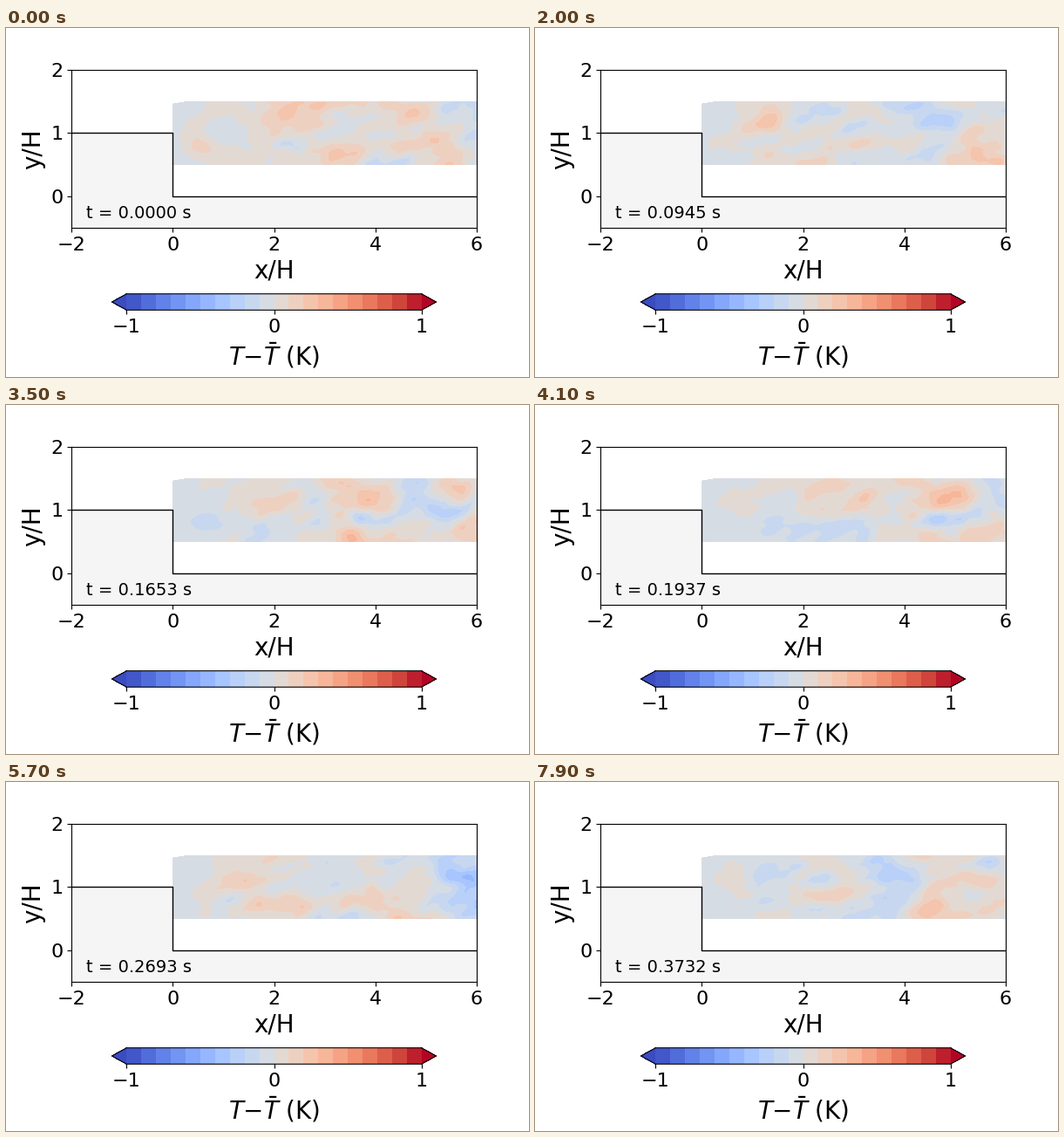
Animation of 600x400 px, one loop 8 s. Source, as a matplotlib script:

```python
import numpy as np
import matplotlib.pyplot as plt
from matplotlib.animation import FuncAnimation

STEPS, INTERVAL = 80, 100
DT = 0.3732 / 79      # simulated seconds per step
PERIOD = 64           # steps until the flow repeats
SPEED = 0.15          # convection, step heights per step
LEVELS = np.linspace(-1, 1, 21)

# Turbulence lives in a periodic box that passes by once per period
NX, NY = 320, 64
BOX_X, BOX_Y = PERIOD * SPEED, 2
rng = np.random.default_rng(11)
kx = 2 * np.pi * np.fft.fftfreq(NX, BOX_X / NX)[None, :]
ky = 2 * np.pi * np.fft.fftfreq(NY, BOX_Y / NY)[:, None]


def eddy_spectrum(length, height, shear, power):
    """Random modes of unit variance, stretched and tilted by the shear."""
    modes = rng.normal(size=(NY, NX)) + 1j * rng.normal(size=(NY, NX))
    modes *= (1 + (length * kx) ** 2 + (height * (ky + shear * kx)) ** 2) ** -power
    modes[0, 0] = 0
    return modes / np.fft.ifft2(modes).real.std()


spectrum = 0.6 * eddy_spectrum(0.5, 0.3, 0.5, 2) + 0.8 * eddy_spectrum(0.16, 0.08, 0.6, 1.7)
turnover = 2 * np.pi / PERIOD * np.rint(rng.normal(0, 1.2, (NY, NX)))
phase_rate = turnover - kx * SPEED

x = np.arange(0, 6 + 1e-9, BOX_X / NX)
eta = np.arange(NY // 2 + 1) * BOX_Y / NY
X, ETA = np.meshgrid(x, eta)
Y = 0.5 + ETA * (0.96 + 0.04 * np.minimum(X / 0.3, 1))

# The mixing layer starts at the lip of the step and widens downstream
MEAN = -0.03 + 0.065 * np.tanh(X / 1.5)
GAIN = 0.13 * (1 - np.exp(-X / 0.6)) * np.exp(-((Y - 0.92) / (0.15 + 0.35 * X)) ** 2)


def temperature(step):
    noise = np.fft.ifft2(spectrum * np.exp(1j * phase_rate * step)).real
    return MEAN + GAIN * noise[:len(eta), :len(x)]


def draw_field(step):
    return ax.contourf(X, Y, temperature(step), LEVELS, cmap="coolwarm", extend="both")


plt.rcParams.update({"font.family": "DejaVu Sans", "font.size": 16})
fig, ax = plt.subplots(figsize=(6, 4), dpi=100)
fig.subplots_adjust(left=0.125, right=0.9, bottom=0.125, top=0.88)

wall_x, wall_y = [-2, 0, 0, 6], [1, 1, 0, 0]
ax.fill_between(wall_x, wall_y, -0.5, color="whitesmoke", lw=0)
ax.plot(wall_x, wall_y, color="black", lw=1)
ax.set(xlim=(-2, 6), ylim=(-0.5, 2), xticks=range(-2, 7, 2), yticks=range(3))
ax.set_xlabel("x/H", fontsize=20)
ax.set_ylabel("y/H", fontsize=20)
clock = ax.text(-1.7, -0.35, "", fontsize=14)

shown = [draw_field(0)]
bar = fig.colorbar(shown[0], ax=ax, orientation="horizontal", shrink=0.8, pad=0.25)
bar.set_ticks([-1, 0, 1], labels=["\u22121", "0", "1"])
bar.set_label("$T$\u2212$\\bar{T}$ (K)", fontsize=20)
bar.minorticks_off()


def update(step):
    shown.pop().remove()
    shown.append(draw_field(step))
    clock.set_text(f"t = {step * DT:.4f} s")
    return shown[0], clock


anim = FuncAnimation(fig, update, frames=STEPS, interval=INTERVAL,
                     repeat=True, repeat_delay=0)
plt.show()
```
